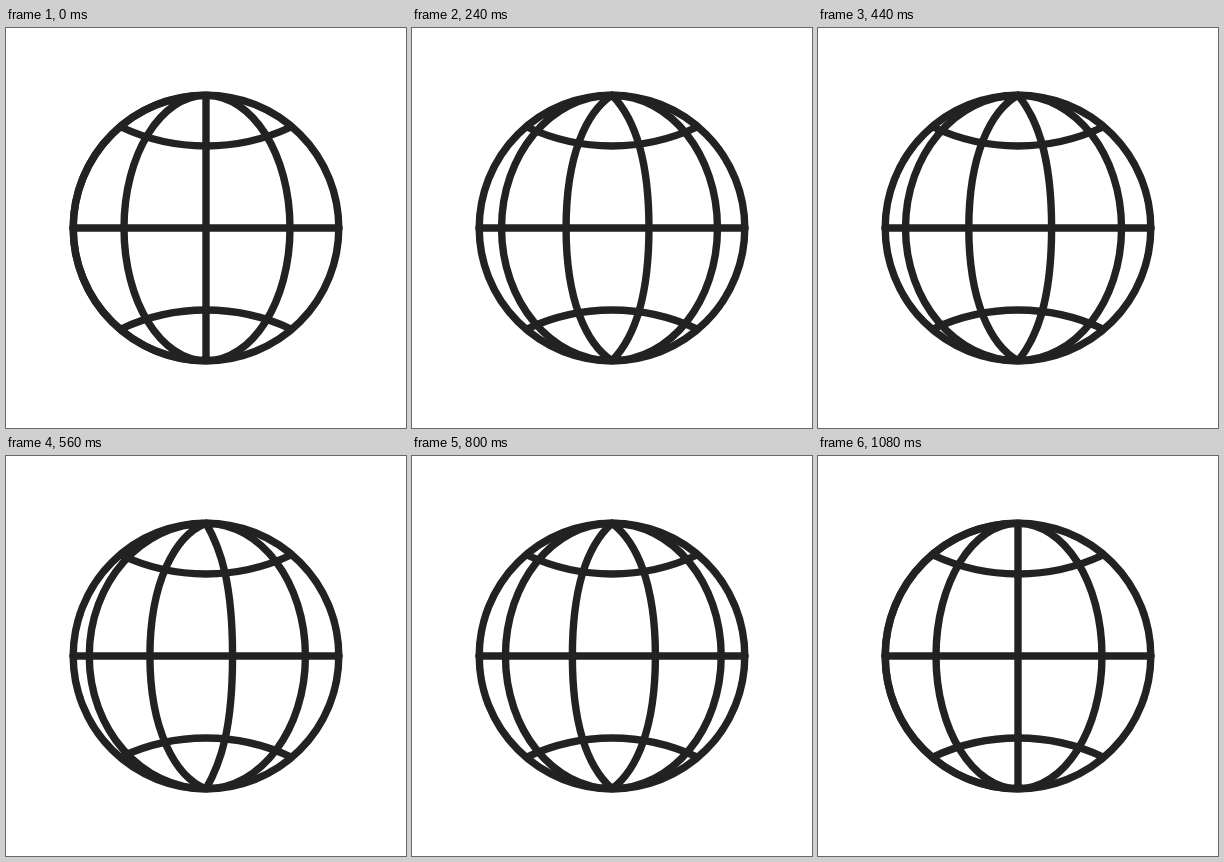
Animation, 400 px wide and 400 px high, one loop 1200 ms. Source, as an HTML page:

```html
<!DOCTYPE html>
<html lang="en">
<head>
<meta charset="utf-8">
<title>Spinning globe</title>
<style>
  html, body { margin: 0; width: 100%; height: 100%; overflow: hidden; background: #fff; }
  svg { display: block; width: 100%; height: 100%; }
</style>
</head>
<body>
<svg viewBox="-200 -200 400 400" fill="none" stroke="#222" stroke-width="7.4" stroke-linecap="round" stroke-linejoin="round">
  <circle r="132.8"/>
  <path d="M-133 0H133M-85-101A200 200 0 0 0 85-101M-85 101A200 200 0 0 1 85 101"/>
  <path id="meridians"/>
</svg>
<script>
const LOOP = 1200, STEP = 40, R = 132.8, KAPPA = 0.5523;
const stops = [-R, -82, 0, 84, R];

// Spin easing: [time in ms, meridian steps travelled]
const keys = [[0, 0], [240, 0.44], [440, 1.4], [560, 2.316], [720, 3.2], [920, 3.84], [1080, 4]];

const slope = i => (keys[i + 1][1] - keys[i][1]) / (keys[i + 1][0] - keys[i][0]);

function speed(i) {
  if (i === 0 || i === keys.length - 1) return 0;
  const before = keys[i][0] - keys[i - 1][0], after = keys[i + 1][0] - keys[i][0];
  return (slope(i - 1) * after + slope(i) * before) / (before + after);
}

// Cubic Hermite interpolation between the keys
function travel(t) {
  const i = keys.findIndex(([time]) => time > t) - 1;
  if (i < 0) return keys[keys.length - 1][1];
  const [t0, a] = keys[i], [t1, b] = keys[i + 1];
  const d = t1 - t0, u = (t - t0) / d, v = 1 - u;
  return a * v * v * (1 + 2 * u) + b * u * u * (3 - 2 * u)
    + d * u * v * (speed(i) * v - speed(i + 1) * u);
}

// Half ellipse whose poles sharpen as it flattens into a straight line
function meridian(x) {
  const pole = R - 38 * Math.max(0, 1 - Math.abs(x) / 82);
  const hx = x * KAPPA, hy = R * KAPPA;
  return `M0 ${-R}C${hx} ${-pole} ${x} ${-hy} ${x} 0S${hx} ${pole} 0 ${R}`;
}

const path = document.getElementById("meridians");

function draw(now) {
  const t = Math.floor(now % LOOP / STEP) * STEP;
  const phase = travel(t) % 1;
  path.setAttribute("d", stops.slice(0, -1)
    .map((x, i) => meridian(x + (stops[i + 1] - x) * phase)).join(""));
}

const start = performance.now();
function tick() {
  draw(performance.now() - start);
  requestAnimationFrame(tick);
}
tick();
</script>
</body>
</html>
```
